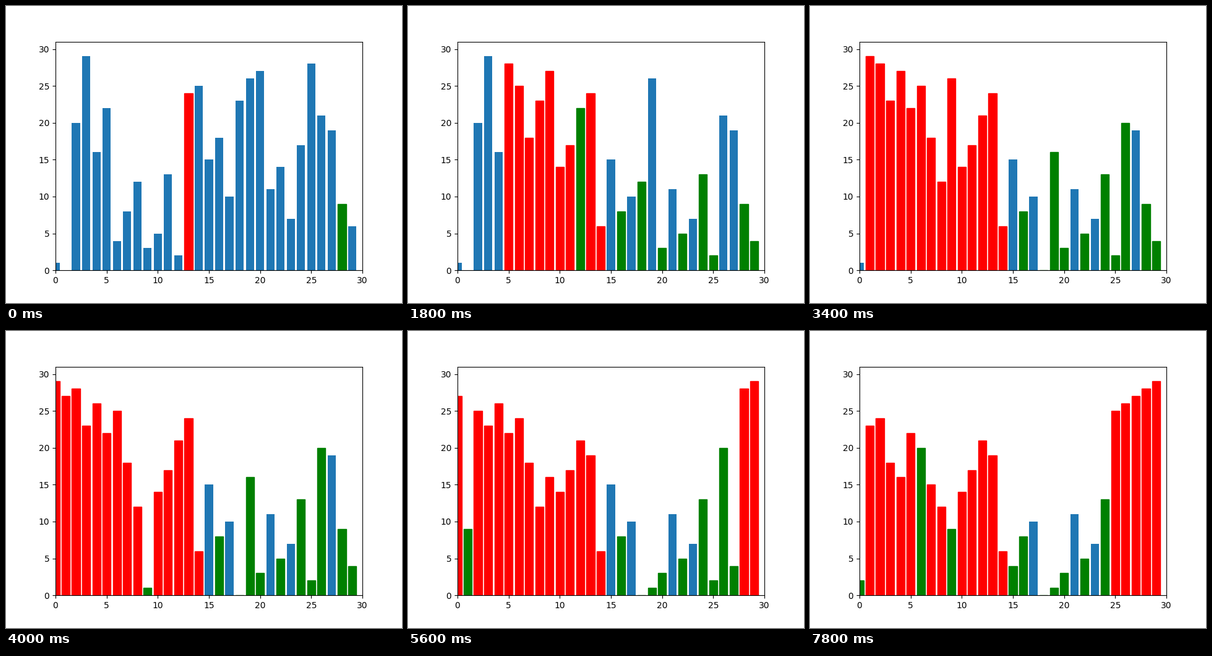
Write a matplotlib script that moves like this. It is 640 px wide and 480 px high and loops after 8 s.

```python
from itertools import islice

import matplotlib.pyplot as plt
from matplotlib.animation import FuncAnimation

FRAMES, INTERVAL = 40, 200
BASE = "tab:blue"
START = [1, 0, 20, 29, 16, 22, 4, 8, 12, 3, 5, 13, 2, 9, 25,
         15, 18, 10, 23, 26, 27, 11, 14, 7, 17, 28, 21, 19, 24, 6]


def sift_down(a, i, size):
    """Restore the max-heap below i, yielding each swapped pair."""
    while True:
        kids = [k for k in (2 * i + 1, 2 * i + 2) if k < size]
        big = max([i] + kids, key=lambda k: a[k])
        if big == i:
            return
        a[i], a[big] = a[big], a[i]
        yield i, big
        i = big


def heap_sort(a):
    n = len(a)
    for i in reversed(range(n // 2)):
        yield from sift_down(a, i, n)
    for end in range(n - 1, 0, -1):
        a[0], a[end] = a[end], a[0]
        yield end, 0
        yield from sift_down(a, 0, end)


def record(count):
    """Heights and colours after each of the first swaps."""
    a, colors, states = START[:], [BASE] * len(START), []
    for i, j in islice(heap_sort(a), count):
        colors[i], colors[j] = "red", "green"
        states.append((a[:], colors[:]))
    return states


states = record(FRAMES)

fig, ax = plt.subplots(figsize=(6.4, 4.8), dpi=100)
bars = ax.bar(range(len(START)), START, color=BASE)
ax.set_xlim(0, 30)
ax.set_ylim(0, 31)


def draw(frame):
    for bar, height, color in zip(bars, *states[frame]):
        bar.set_height(height)
        bar.set_facecolor(color)
        bar.set_edgecolor("none" if color == BASE else color)
    return list(bars)


anim = FuncAnimation(fig, draw, frames=FRAMES, init_func=lambda: draw(0),
                     interval=INTERVAL, repeat=True, repeat_delay=0)
plt.show()
```
